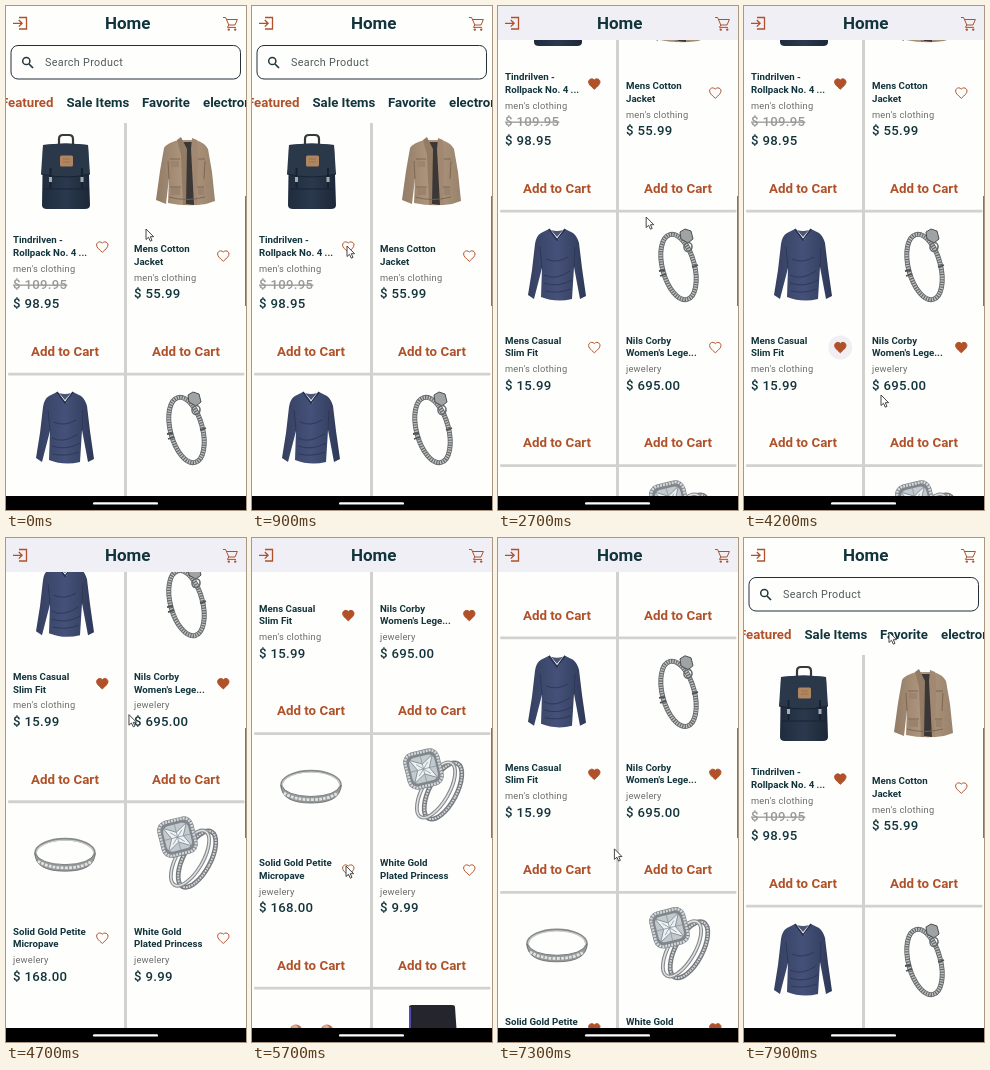
Animation, 240 px wide and 504 px high, one loop 8000 ms. Source, as an HTML page:

```html
<!DOCTYPE html>
<html lang="en">
<head>
<meta charset="utf-8">
<title>Shop</title>
<style>
html, body { margin: 0; width: 100%; height: 100%; overflow: hidden; background: #fefefc; }
svg { display: block; width: 240px; height: 504px; font-family: Roboto, Arial, sans-serif; }
</style>
</head>
<body>
<svg id="stage" viewBox="0 0 240 504"></svg>
<script>
const INK = '#12343c', RUST = '#b0512a', GREY = '#6c6c6c', LOOP = 8000;
const ROW = 254.5, TOP = 113.5;

const text = (x, y, str, size, { fill = INK, weight = 500, gap = 0, extra = '' } = {}) =>
  `<text x="${x}" y="${y + size * 0.355}" font-size="${size}" font-weight="${weight}" fill="${fill}" letter-spacing="${gap}" ${extra}>${str}</text>`;
const path = (d, fill, stroke = 'none', width = 1, extra = '') =>
  `<path d="${d}" fill="${fill}" stroke="${stroke}" stroke-width="${width}" ${extra}/>`;
const rect = (x, y, w, h, fill, extra = '') =>
  `<rect x="${x}" y="${y}" width="${w}" height="${h}" fill="${fill}" ${extra}/>`;
const ring = (cx, cy, rx, ry, turn, stroke, width, extra = '') =>
  `<ellipse cx="${cx}" cy="${cy}" rx="${rx}" ry="${ry}" transform="rotate(${turn} ${cx} ${cy})" fill="none" stroke="${stroke}" stroke-width="${width}" ${extra}/>`;
const gradient = (id, ...stops) => `<linearGradient id="${id}">` +
  stops.map((c, i) => `<stop offset="${i / (stops.length - 1)}" stop-color="${c}"/>`).join('') + '</linearGradient>';

// Products: liked = moment of the tap, glow = moment its tap highlight disappears
const products = [
  { title: ['Tindrilven -', 'Rollpack No. 4 ...'], kind: "men's clothing", price: '98.95', old: '109.95', liked: 1000, glow: 2100 },
  { title: ['Mens Cotton', 'Jacket'], kind: "men's clothing", price: '55.99' },
  { title: ['Mens Casual', 'Slim Fit'], kind: "men's clothing", price: '15.99', liked: 3700, glow: 4320 },
  { title: ['Nils Corby', "Women's Lege..."], kind: 'jewelery', price: '695.00', liked: 3150, glow: 3700 },
  { title: ['Solid Gold Petite', 'Micropave'], kind: 'jewelery', price: '168.00', liked: 5800, glow: 6300 },
  { title: ['White Gold', 'Plated Princess'], kind: 'jewelery', price: '9.99', liked: 6300, glow: 7150 },
];

const heart = 'M12 21.3C5.4 15.4 2 12.3 2 8.5 2 5.4 4.4 3 7.5 3c1.7 0 3.4.8 4.5 2.1C13.1 3.8 14.8 3 16.5 3 19.6 3 22 5.4 22 8.5c0 3.8-3.4 6.9-10 12.8z';

function card(p, i) {
  const x = i % 2 ? 128 : 7, y = TOP + ROW * (i >> 1), lift = p.old ? 9 : 0;
  const money = (dy, value, opt) => text(x, y + dy, '$ ' + value, 13.2, { gap: 0.3, ...opt });
  return p.title.map((s, n) => text(x, y + 129.5 - lift + n * 12.5, s, 9.7, { weight: 700 })).join('') +
    text(x, y + 158 - lift, p.kind, 9.3, { fill: GREY, weight: 400, gap: 0.22 }) +
    (p.old ? money(165, p.old, { fill: '#999', extra: 'text-decoration="line-through"' }) : '') +
    money(p.old ? 183.5 : 174.3, p.price) +
    `<g transform="translate(${x + 89.3} ${y + 136.5 - lift})"><circle id="glow${i}" r="12" fill="#f1eff3"/>` +
    `<path id="heart${i}" d="${heart}" transform="scale(.57) translate(-12 -12)" stroke="${RUST}" stroke-width="1.7"/></g>` +
    text(x + 52, y + 231.7, 'Add to Cart', 13.3, { fill: RUST, weight: 700, extra: 'text-anchor="middle"' });
}

const dividers = () => rect(118, TOP + 3.5, 3, ROW * 4, '#d1d1cf') +
  [1, 2, 3].map(r => rect(2, TOP + ROW * r - 1.3, 236.5, 2.8, '#d1d1cf', 'rx="1"')).join('');

const backpack = () =>
  path('M53 139V133Q53 129 57 129H63Q67 129 67 133V139', 'none', '#34393a', 2.2) +
  path('M37 139Q60 136 82 139L84 199Q84 203 79 203H41Q36 203 36 199Z', 'url(#navy)') +
  path('M37 139Q60 136 82 139L84 168Q60 173 35 168Z', '#2a384a') +
  path('M35 168Q60 174 84 168M38 183H82', 'none', '#182332', 1) +
  rect(54, 149.5, 13, 11, '#b08660', 'rx="1.5"') + path('M57 153H64M57 156H64', 'none', '#8d6a4a', 0.7) +
  [43.5, 75].map(x => rect(x, 162, 2, 20, '#172231') + rect(x - 0.5, 171, 3, 5, '#a9adad')).join('');

const jacket = () =>
  path('M172 134Q161 137 158 142L154 165L150 194L160 198L163 172L162 197Q180 201 200 198L198 172L200 198L209 195L206 166L202 143Q199 137 190 134Z', 'url(#tan)') +
  path('M174 136L187 136L189 160L188 199L180 198L180 157Z', '#3b3736') +
  path('M171 134L175 131L181 143L180 199L177 199L175 149Z', '#937c66') +
  path('M186 132L191 134L192 148L191 199L188 199L185 143Z', '#a08872') +
  path('M163 173L162 155M198 173L199 155M164 153H174M192 153H199M164 181H175M191 181H198M163 191Q180 196 199 191', 'none', '#7a6450', 0.9) +
  rect(165, 155, 8, 6, '#9c8570') + rect(165, 182, 9, 7, '#9a836e') + rect(192, 182, 6, 7, '#9a836e');

const sweater = () =>
  path('M51 386L43 390Q38 393 37 401L34 427L30 452L36 456L44 425L43 454Q58 460 74 456L76 424L82 456L88 453L84 425L81 400Q79 393 75 390L67 386L60 397Z', 'url(#blue)') +
  path('M51 386L59 397L67 386', 'none', '#263252', 1.6) +
  path('M53 387L59 394L65 387Q59 389 53 387Z', '#4d5672') +
  path('M44 425L42 404M76 424L77 404M46 432Q57 438 72 428M46 440Q60 445 74 437M47 448Q60 451 73 446M48 416Q58 421 70 414', 'none', '#2c3654', 0.9);

const bracelet = () =>
  ring(180.5, 424, 16, 33.5, -15, '#66686a', 5) + ring(180.5, 424, 16, 33.5, -15, '#bfc2c2', 3.4, 'stroke-dasharray="1.3 1.2"') +
  path('M182 389L187 386L193 388L195 396L190 400L183 396Z', '#a0a3a4', '#4d5052', 1) +
  ring(190, 404, 4, 4.5, 10, '#666a6c', 1.6) +
  path('M161 428L167 427M162 433L168 431M194 424L200 422', 'none', '#505456', 1.8);

const band = () =>
  ring(59, 674, 29.5, 14, 0, '#85898a', 2.6) + ring(59, 674, 28.8, 13, 0, '#c9cccc', 1.2) +
  path('M29 674Q29 692 59 692Q89 692 89 674Q84 685 59 685.5Q34 685 29 674Z', '#96999a', '#707475', 0.9) +
  path('M32 682Q42 688.7 59 688.7Q76 688.7 86 682', 'none', '#e2e4e4', 2.8, 'stroke-dasharray="2.7 1.3"');

const diamond = () =>
  ring(191, 680, 13.5, 31, 28, '#777b7f', 4.8) + ring(191, 680, 13.5, 31, 28, '#d3d6d8', 2, 'stroke-dasharray="1.8 1"') +
  ring(184, 679, 13, 31, 30, '#85898c', 3.8) + ring(184, 679, 13, 31, 30, '#dfe1e2', 1.6) +
  `<g transform="translate(171.5 658) rotate(-14)">` +
  rect(-18.5, -19, 37, 38, '#80868b', 'rx="10"') + rect(-16.5, -17, 33, 34, 'none', 'rx="8" stroke="#d3d8db" stroke-width="2.6" stroke-dasharray="2 1"') +
  rect(-13, -13, 26, 26, '#c3cace', 'rx="6"') +
  path('M-12 -12L0 -5L12 -12L6 0L12 12L0 5L-12 12L-6 0Z', '#eef1f3', '#7d8890', 0.8) +
  path('M0 -13V13M-13 0H13M-6 -6L6 6M6 -6L-6 6', 'none', '#87929a', 0.7) + '</g>';

const lastRow = () =>
  [44, 75].map(x => `<circle cx="${x}" cy="920" r="6.5" fill="#b9724f"/><circle cx="${x - 1}" cy="917" r="3" fill="#e0ac8c"/>`).join('') +
  path('M157 896Q157 894 160 894H200Q203 894 203 896L206 940H157Z', '#25262d') + path('M158 896V940', 'none', '#514bb0', 2);

const defs = '<defs>' + gradient('navy', '#1f2c3e', '#2a394d', '#1c2838') + gradient('tan', '#937c66', '#b09880', '#9a836c') +
  gradient('blue', '#343f60', '#46517a', '#2e3958') + '</defs>';

const search = rect(5, 39.5, 229.5, 33.5, '#fefefc', 'rx="7" stroke="#222f36"') +
  '<circle cx="20.3" cy="55" r="3.6" fill="none" stroke="#24373c" stroke-width="1.5"/>' + path('M23 58L27 62', 'none', '#24373c', 1.7) +
  text(39, 56.5, 'Search Product', 10.75, { fill: '#525a5c', weight: 400, gap: 0.34 });

const tabs = [[-5, 'Featured'], [60.5, 'Sale Items'], [136, 'Favorite'], [197, 'electronics']]
  .map(([x, s], i) => text(x, 96.5, s, 13.2, { fill: i ? INK : RUST, weight: 700 })).join('');

const header = rect(0, 0, 240, 34, '#fefefc', 'id="bar"') +
  path('M13 11.5H20.5V23H13M7 17.3H16M12.8 14L16.1 17.3L12.8 20.6', 'none', RUST, 1.3) +
  path('M217 11.5H219.6L222.8 19H229L231.4 13.5H220.6M222.8 19L221.4 21.4H230', 'none', RUST, 1) +
  `<circle cx="222.8" cy="23.6" r="1.2" fill="${RUST}"/><circle cx="229.2" cy="23.6" r="1.2" fill="${RUST}"/>` +
  text(121.7, 16.9, 'Home', 17, { weight: 700, extra: 'text-anchor="middle"' });

const $ = id => document.getElementById(id);
$('stage').innerHTML = defs + rect(0, 0, 240, 504, '#fefefc') +
  '<g id="page">' + search + tabs + dividers() + backpack() + jacket() + sweater() + bracelet() + band() + diamond() + lastRow() +
  products.map(card).join('') + '</g>' + header +
  rect(239, 190, 1, 110, '#777') + rect(0, 490, 240, 14, '#000') + rect(87, 496.2, 65, 2.4, '#fff', 'rx="1.2"') +
  path('M0 0V10.5L2.5 8.3L4.3 12.2L6 11.4L4.3 7.7H7.6Z', '#fff', '#333', 0.9, 'id="cursor"');

const smooth = u => u * u * (3 - 2 * u), linear = u => u, out = u => 1 - (1 - u) ** 2;

// Keys: [time, values, easing into this key]
const scroll = [[0, [0]], [2050, [0]], [2350, [105], linear], [2680, [163], out], [4300, [163]], [4700, [358.4], linear],
  [5000, [427], out], [7100, [427]], [7400, [190], linear], [7680, [0], out], [LOOP, [0]]];
const pointer = [[0, [140, 223]], [200, [140, 223]], [850, [95, 240]], [1200, [95, 240]], [1800, [151, 336]], [2050, [151, 336]],
  [2350, [143, 215], linear], [2650, [145, 205], out], [3050, [216, 340]], [3250, [216, 340]], [3600, [95, 340]],
  [3800, [95, 340]], [4150, [137, 389]], [4290, [137, 389]], [4700, [123, 177], linear], [4850, [120, 150], out],
  [5600, [94, 328]], [5850, [94, 328]], [6220, [216, 331]], [6420, [216, 331]], [6950, [98, 138]], [7090, [98, 138]],
  [7400, [125, 392], linear], [7500, [127, 400], out], [7880, [145, 94]], [LOOP, [145, 94]]];

function at(keys, t) {
  const i = keys.findIndex(k => k[0] > t), [t0, a] = keys[i - 1], [t1, b, ease = smooth] = keys[i];
  const u = ease((t - t0) / (t1 - t0));
  return a.map((v, n) => v + (b[n] - v) * u);
}

function draw(t) {
  const [s] = at(scroll, t), [x, y] = at(pointer, t);
  $('page').setAttribute('transform', `translate(0 ${-s})`);
  $('cursor').setAttribute('transform', `translate(${x} ${y})`);
  const k = Math.min(1, s / 30);
  $('bar').setAttribute('fill', `rgb(${254 - 14 * k},${254 - 15 * k},${252 - 7 * k})`);
  products.forEach((p, i) => {
    $('heart' + i).setAttribute('fill', t >= p.liked ? RUST : 'none');
    $('glow' + i).setAttribute('opacity', t >= p.liked && t < p.glow ? Math.min(1, (t - p.liked) / 150) : 0);
  });
}

function tick() {
  draw(performance.now() % LOOP);
  requestAnimationFrame(tick);
}
tick();
</script>
</body>
</html>
```
